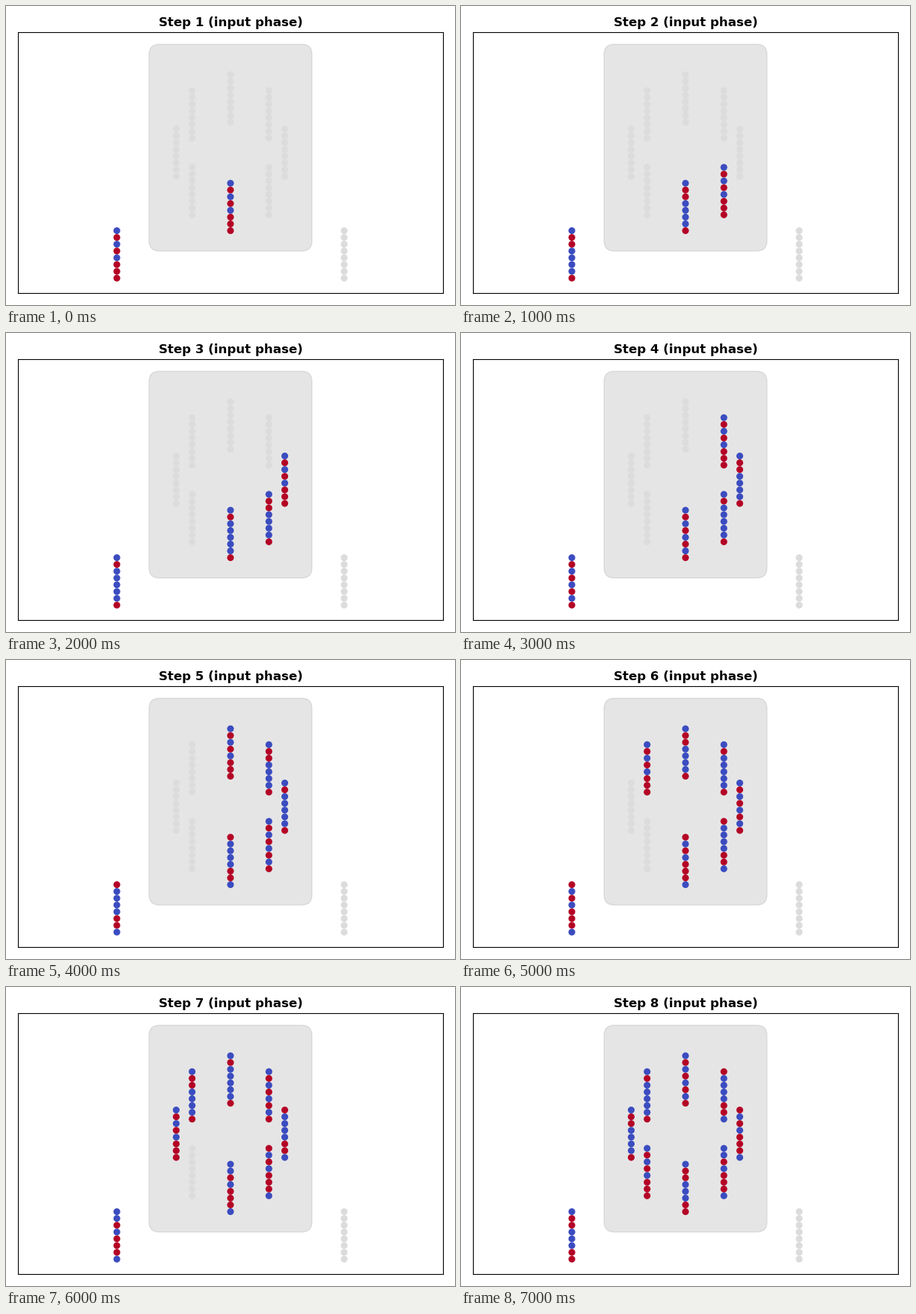
These frames come from a looping animation (600x400 px, 8 s). A matplotlib script:

```python
import numpy as np
import matplotlib.pyplot as plt
from matplotlib.animation import FuncAnimation
from matplotlib.collections import PatchCollection
from matplotlib.patches import Circle, FancyBboxPatch

plt.rcParams["text.hinting"] = "default"

WIDTH, HEIGHT = 600, 400
STEPS = 8
BITS = 8
RADIUS = 8
PORT_X, PORT_Y = 16.75, -15

# Words fed in one per step, most significant bit on top.
WORDS = ["01010111", "01100001", "01000001", "01010101",
         "10000110", "10101110", "00101110", "01100011"]

cmap = plt.get_cmap("coolwarm")
BLANK = [cmap(0.5)] * BITS


def column(x, y):
    """Vertical stack of touching dots centred on (x, y), listed from the top."""
    return [Circle((x, y + (BITS - 1) / 2 - i), 0.5) for i in range(BITS)]


def word_colors(word):
    return [cmap(float(bit)) for bit in word]


fig = plt.figure(figsize=(WIDTH / 100, HEIGHT / 100), dpi=100)
side, head = 15.55, 35.33  # margins in pixels
ax_w, ax_h = WIDTH - 2 * side, HEIGHT - side - head
ax = fig.add_axes([side / WIDTH, side / HEIGHT, ax_w / WIDTH, ax_h / HEIGHT])
ax.set_xticks([])
ax.set_yticks([])
title = ax.set_title("Step 1 (input phase)", fontsize=12, fontweight="bold",
                     fontfamily="DejaVu Sans")

# Same scale on both axes.
bottom, top = -20.75, 17.75
half = (top - bottom) * ax_w / ax_h / 2
ax.set_xlim(-half, half)
ax.set_ylim(bottom, top)

ax.add_patch(FancyBboxPatch((-10.5, -13), 21, 27.5,
                            boxstyle="round,pad=1.5", color="gray", alpha=0.2))

# Ring slots run counterclockwise from the bottom, then the two ports.
angles = -np.pi / 2 + 2 * np.pi * np.arange(STEPS) / STEPS
dots = []
for a in angles:
    dots += column(RADIUS * np.cos(a), RADIUS * np.sin(a))
dots += column(-PORT_X, PORT_Y) + column(PORT_X, PORT_Y)
cells = PatchCollection(dots, linewidths=0, zorder=2)
ax.add_collection(cells, autolim=False)


def update(step):
    colors = []
    for slot in range(STEPS):
        colors += word_colors(WORDS[step - slot]) if slot <= step else BLANK
    colors += word_colors(WORDS[step]) + BLANK
    cells.set_facecolor(colors)
    title.set_text(f"Step {step + 1} (input phase)")
    return cells, title


anim = FuncAnimation(fig, update, frames=STEPS, interval=1000,
                     repeat=True, repeat_delay=0, blit=False)
plt.show()
```
